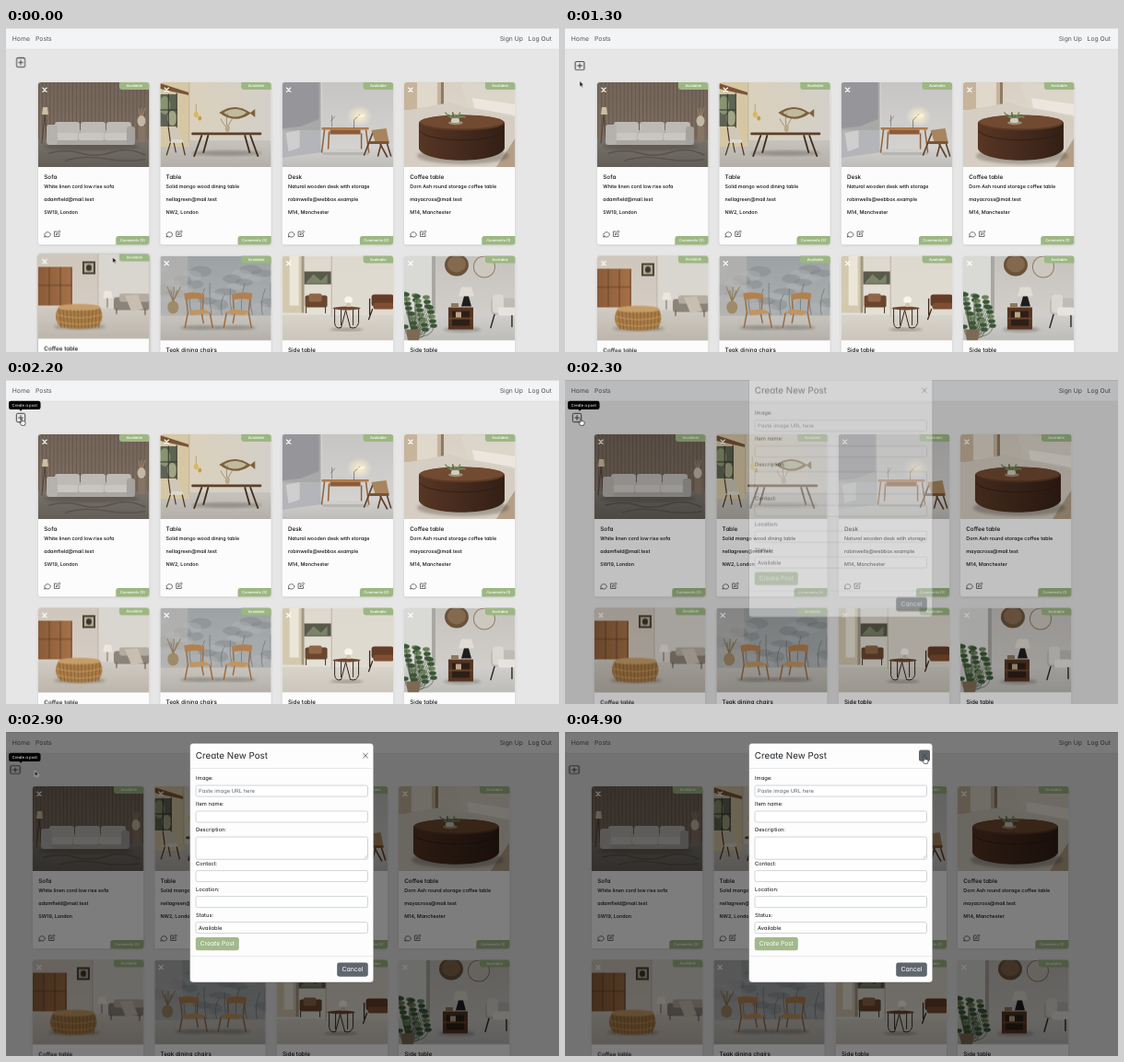
These frames come from a looping animation (600 by 352 pixels, 5 s). An HTML page:

```html
<!DOCTYPE html>
<html lang="en">
<head>
<meta charset="utf-8">
<title>Furniture posts</title>
<style>
  html, body { margin: 0; width: 100%; height: 100%; overflow: hidden; background: #e6e6e6; }
  svg { display: block; }
  text {
    font-family: Inter, "Open Sans", sans-serif;
    font-feature-settings: "cv11";
    text-rendering: geometricPrecision;
  }
  .card text { font-weight: 500; }
</style>
</head>
<body>
<svg id="stage" width="600" height="352" viewBox="0 0 600 352" xmlns="http://www.w3.org/2000/svg"></svg>
<script>
const LOOP = 5000;
const GREEN = '#9db783', INK = '#101112';
const CARD_W = 120.5, CARD_H = 176.5, PHOTO_H = 92;

const rect = (x, y, w, h, fill, rx = 0, more = '') =>
  `<rect x="${x}" y="${y}" width="${w}" height="${h}" fill="${fill}" rx="${rx}" ${more}/>`;
const oval = (x, y, rx, ry, fill, more = '') =>
  `<ellipse cx="${x}" cy="${y}" rx="${rx}" ry="${ry}" fill="${fill}" ${more}/>`;
const fill = (d, color) => `<path d="${d}" fill="${color}"/>`;
const line = (d, color, w = 1) =>
  `<path d="${d}" fill="none" stroke="${color}" stroke-width="${w}" stroke-linecap="round" stroke-linejoin="round"/>`;
const text = (x, y, size, str, color = INK, anchor = 'start') =>
  `<text x="${x}" y="${y}" font-size="${size}" fill="${color}" text-anchor="${anchor}">${str}</text>`;
const cross = (x, y, r, color, w) =>
  line(`M${x - r} ${y - r}l${2 * r} ${2 * r}M${x + r} ${y - r}l${-2 * r} ${2 * r}`, color, w);
const repeat = (n, make) => Array.from({ length: n }, (_, i) => make(i)).join('');
const room = (wall, floor, y) =>
  rect(0, 0, 121, 92, `url(#${wall})`) + rect(0, y, 121, 92 - y, `url(#${floor})`);
const shadow = (x, y, rx, ry) => oval(x, y, rx, ry, '#3a332c', 'opacity=".3" filter="url(#blur)"');
const gradient = (id, a, b, dir = 'x2="0" y2="1"') =>
  `<linearGradient id="${id}" ${dir}><stop stop-color="${a}"/><stop offset="1" stop-color="${b}"/></linearGradient>`;

// Wooden chair, mirrored with dir = -1
const chair = (x, y, dir) => `<g transform="translate(${x} ${y}) scale(${dir} 1)">` +
  line('M1 0L3 20L0 36M20 1L19 18M27 20L30 36M18 20L20 31', '#9a6a3f', 1.4) +
  fill('M-1 -1Q10 -4 21 0L20.500 6Q10 3 0 6Z', '#b3804f') +
  fill('M2 18L20 16L29 20L8 22.500Z', '#c3945f') + '</g>';

const photos = [
  // sofa
  () => room('slat', 'rug', 62) +
    repeat(30, i => rect(i * 4.1, 0, 1, 62, '#54473d', 0, 'opacity=".5"')) +
    line('M7 36L4 66M7 36L10 66', '#3b322b', 0.7) + fill('M5 27h5l1 8h-7z', '#cdbda2') +
    shadow(58, 70, 52, 4) +
    rect(11, 52, 93, 16, '#aaa7a2', 2.5) +
    repeat(3, i => rect(18 + i * 28, 43, 27, 14, '#bdbab5', 3)) +
    repeat(3, i => rect(16 + i * 28, 55, 27.5, 8, '#c9c6c2', 2)) +
    rect(9, 46, 12, 22, '#b5b2ad', 3) + rect(96, 48, 9, 20, '#a5a29d', 3) +
    line('M13 69L103 69', '#5e5953') +
    line('M111 37l-2-8M113 37l3-9M112 37v-9', '#a99272', 0.7) +
    oval(112, 42, 4.5, 6, '#c3b7a6') + rect(109, 48, 7, 17, '#857565') +
    line('M12 77q18-5 34 0t34-1t36 3M30 85q20-6 42-2t44 1', '#57534c', 1.4),
  // dining table
  () => room('plaster', 'stone', 63) +
    rect(0, 0, 31, 70, '#d6c7a4') + rect(0, 13, 18, 35, '#5d6453') +
    oval(5, 25, 6, 10, '#89936f') + oval(13, 39, 5, 8, '#a3a486') +
    line('M0 30H18M9 13V48M18 12V49', '#34322c') + fill('M0 1L31 11V14L0 7Z', '#7a5535') +
    rect(31, 0, 1, 64, '#bdb19a') +
    line('M39 24v14', '#b0904d', 0.7) + oval(39, 35, 2.5, 3, '#d9b75e') + oval(43, 39, 2, 2.5, '#c39c47') +
    fill('M64 33Q81 21 98 33L103 29V38L98 34Q81 46 64 33Z', '#80603c') +
    fill('M69 33Q81 25 94 33Q81 42 69 33Z', '#bdbc9c') +
    shadow(72, 77, 38, 3) +
    line('M45 58L37 80M98 58L106 80M52 58L47 76M92 58L97 76', '#43301f', 1.9) +
    rect(34, 54.5, 76, 2.8, '#5b402b', 1) +
    line('M73 49q-2-9 0-15M73 49q4-8 6-11M72 49q-5-6-6-9', '#7d6647', 0.6) + oval(73, 50, 2.5, 4, '#bba98a') +
    fill('M9 49L20 50L24 65L10 65Z', '#cfc8ba') + rect(10, 62, 15, 4, '#ddd6c9', 2) +
    line('M11 66L7 79M24 66L27 79M15 66L17 76M9 49L11 64', '#4c3725', 1.2),
  // desk
  () => room('pale', 'silver', 72) +
    rect(0, 0, 43, 56, '#a9a8a6') + fill('M0 0H40V40L20 48L0 50Z', '#96969a') +
    fill('M0 52H43V76L0 82Z', '#b4b5b8') + fill('M4 55L19 52V71L7 75Z', '#cfcfcf') +
    rect(42, 0, 1.2, 73, '#dcd9d4') +
    oval(84, 37, 14, 12, 'url(#glow)') +
    rect(44, 76, 50, 3, '#a5a19c', 1, 'opacity=".5"') +
    line('M46 51L43 76M91 52L94 76M51 54L50 72M86 56L86 72', '#8f5f3b', 1.5) +
    rect(43, 49, 51, 2.5, '#b07a4c', 0.6) + rect(52, 51.5, 33, 5, '#8d5c39') +
    line('M78 49V41L84 35', '#6b5e50', 0.7) + fill('M80 37L90 34L89 38Z', '#fbf2d9') +
    rect(58, 46.5, 11, 2.5, '#cfcac2') + line('M54 48V36M53 42L57 37', '#6f756c', 0.7) +
    line('M99 53L89 79M101 57L114 81M111 53L104 80M113 64L118 80', '#5d4029', 1.6) +
    fill('M97 52L113 50L116 65L101 65Z', '#a8855f') + rect(94, 64, 22, 3, '#7b5536', 1),
  // round coffee table
  () => room('cream', 'shag', 28) +
    rect(0, 0, 42, 30, '#c6b49b') + rect(14, 0, 22, 28, '#dfd8cb') + rect(40, 0, 3, 30, '#8e7a62') +
    fill('M0 31L50 22L121 44V92H0Z', '#d6cec2') +
    fill('M62 3Q66 -2 74 1L121 7V38L70 25Z', '#dcd5ca') +
    fill('M74 17L121 24V36L76 28Z', '#ebe6de') + fill('M121 60V92H100Z', '#b39f88') +
    shadow(64, 80, 50, 9) +
    fill('M16 44V72C22 89 102 89 109 72V44Z', 'url(#walnut)') +
    oval(62.5, 44, 46.5, 8.5, '#5a3825') + oval(62.5, 43, 45.5, 7.5, '#714a31') +
    line('M17 53C26 66 99 66 108 53', '#2c1a12', 0.7) +
    oval(56, 44, 8, 2.2, '#a08a74') +
    repeat(9, i => line(`M55 40Q${46 + i * 2.3} 36 ${45 + i * 2.6} ${33 + (i % 3) * 2.5}`, i % 2 ? '#547045' : '#76905f', 1.6)) +
    rect(51, 39, 9, 5, '#d0ccc0', 2),
  // woven table
  () => room('sand', 'beige', 59) +
    rect(65, 0, 56, 59, '#d9d5cf') + rect(64.5, 0, 0.8, 60, '#b5aca1') +
    rect(0, 14, 37, 42, 'url(#oak)') + line('M12 15V55M24 15V55M36 15V55M0 34H36', '#5f3d26', 0.8) +
    rect(48, 8, 14, 14, '#4a4238') + rect(50, 10, 10, 10, '#b5a98f') + oval(55, 15, 3, 3.5, '#3e372e') +
    line('M75 48V58', '#7a6b58') + fill('M72 40h7l2 8h-11z', '#ece6db') +
    rect(82, 47, 39, 14, '#8c8379', 3) + rect(88, 43, 33, 9, '#b4aca1', 3) +
    fill('M94 45L108 44L114 60L101 62Z', '#c9bfb1') +
    line('M85 60v5M116 60v6', '#58483a') + shadow(45, 79, 28, 3) +
    fill('M22 58Q15 70 24 79Q44 84 65 79Q73 70 67 58Z', '#a97c48') +
    oval(44.5, 58, 23, 3.8, '#c79e69') +
    repeat(12, i => line(`M${23 + i * 4} 61L${25 + i * 3.7} 80`, '#735027', 0.6)) +
    line('M20 66Q45 73 69 66M20 73Q45 80 70 73', '#cfa86c', 0.7),
  // chairs and mural
  () => room('mist', 'stone', 65) +
    repeat(26, i => oval((i * 37) % 121, 14 + (i * 17) % 46, 9 + i % 4, 4 + i % 3, i % 2 ? '#7d8385' : '#b4b7b8', 'opacity=".4"')) +
    repeat(9, i => line(`M${34 + i * 11} 64q-3-14 ${i % 2 ? 3 : -2} -${22 + i % 3 * 6}`, '#737a7b', 0.8)) +
    rect(0, 0, 30, 65, '#b9b8b5', 0, 'opacity=".6"') +
    shadow(44, 78, 22, 2.5) + shadow(82, 78, 22, 2.5) +
    repeat(5, i => line(`M14 50L${8 + i * 3.5} ${34 + i % 2 * 4}`, '#8f7a57', 1)) + oval(14, 56, 6, 7, '#a08a68') +
    chair(27, 42, 1) + chair(99, 42, -1),
  // wire side table
  () => room('white', 'bone', 64) +
    rect(0, 0, 22, 62, '#d3c9af') + rect(8, 0, 10, 54, '#ebe6d8') +
    rect(21, 0, 3, 62, '#a39a85') + rect(24, 17, 30, 14, '#5a5a4b') +
    fill('M26 29L34 20L42 27L49 20V30H26Z', '#7c8468') +
    rect(25, 43, 24, 13, '#6b462f', 2) + rect(29, 41, 14, 9, '#8f6748', 2) +
    line('M26 56V62M47 56V62', '#3a2c22') + rect(53, 0, 1.5, 66, '#c4bdae') +
    rect(54.5, 0, 66, 64, '#dfdad0', 0, 'opacity=".8"') +
    rect(97, 42, 24, 13, '#643c28', 3) + rect(99, 51, 22, 7, '#7e4e33', 2) +
    line('M95 47V64M98 58L94 69', '#3d291d', 1.3) +
    shadow(70, 80, 18, 2) +
    line('M57 58V73Q58 80 64 78L69 59L74 78Q81 80 83 73V58M64 58V75M77 58V75', '#33281f', 1) +
    oval(70, 57, 15, 1.9, '#6f4730') + oval(72, 48, 4.5, 4, '#f8f5ee') + rect(70, 51, 4, 4.5, '#cfc3ad'),
  // box side table
  () => room('taupe', 'silver', 63) +
    rect(0, 0, 34, 63, '#d9d9d6') + rect(30, 0, 4, 63, '#a9a6a0') +
    oval(57, 10, 13, 12, '#6a533c') + oval(57, 9, 10, 9, '#83694e') +
    oval(87, 12, 12, 12, '#8c7a64') + oval(87, 12, 11, 11, '#cdc8bf') +
    rect(94, 46, 27, 18, '#bfbcb7', 4) + rect(96, 42, 12, 20, '#d9d7d2', 4) +
    rect(102, 56, 19, 9, '#e6e3de', 3) + line('M98 64L94 78M117 65V77', '#2b2622', 1.4) +
    shadow(63, 80, 20, 3) +
    rect(48, 56, 27, 24, '#553522') + rect(52, 60, 19, 16, '#2d1f17') +
    rect(48, 67, 27, 2, '#6b452c') + rect(56, 61, 6, 6, '#b9a789') +
    fill('M62 34H73L76 44H59Z', '#e1dcd2') + fill('M65 44H70L73 55H62Z', '#1e1d1d') +
    rect(51, 51.5, 8, 4, '#8b795e') +
    repeat(30, i => {
      const x = (i * 13) % 33, y = 41 + (i * 7) % 40;
      return line(`M10 88Q${x} ${y + 13} ${x} ${y}`, '#3e5337', 0.6) + oval(x, y, 3.8, 2.3, i % 3 ? '#3a5638' : '#6b8057');
    }) + fill('M2 80H18L16 92H4Z', '#7d6a55')
];

const items = [
  ['Sofa', 'White linen cord low rise sofa', 'adamfield@mail.test', 'SW19, London', 3],
  ['Table', 'Solid mango wood dining table', 'nellagreen@mail.test', 'NW2, London', 3],
  ['Desk', 'Natural wooden desk with storage', 'robinwells@webbox.example', 'M14, Manchester', 0],
  ['Coffee table', 'Dorn Ash round storage coffee table', 'mayacross@mail.test', 'M14, Manchester', 1],
  ['Coffee table'], ['Teak dining chairs'], ['Side table'], ['Side table']
];

const details = ([, about, mail, place, count]) =>
  text(6.3, 114.7, 5.4, about) + text(6.3, 128.8, 5.45, mail) + text(6.3, 142.8, 5.4, place) +
  line('M8 167.500l-1.300.700.400-1.800A3.200 2.700 0 1 1 8 167.500z', '#444', 0.75) +
  line('M20 162h-2.500v5.500h5.500v-2.500M19.500 165.500l.400-1.700 3-2.700 1.200 1.200-3 2.700z', '#444', 0.75) +
  rect(84.3, 166.9, 45, 20, GREEN, 3) + text(102.4, 173, 4, `Comments (${count})`, '#fff', 'middle');

const card = (item, i) => `<g class="card" transform="translate(${34.9 + (i % 4) * 132.35} ${i < 4 ? 59 : 247.5})"><g id="card${i}">
  ${rect(0, 0.8, CARD_W, CARD_H, '#000', 3, `id="shade${i}" opacity=".1" filter="url(#blur)"`)}
  <g clip-path="url(#cardShape)">
  ${rect(0, 0, CARD_W, CARD_H, '#fcfcfc')}
  <svg width="${CARD_W}" height="${PHOTO_H}"><g filter="url(#soft)">${photos[i]()}</g></svg>
  ${rect(88, -10, 45, 18, GREEN, 3) + text(104.2, 5.1, 4, 'Available', '#fff', 'middle')}
  ${cross(7, 8.2, 2.2, '#fff', 1.1)}
  ${text(6.3, 104.5, 6.3, item[0])}
  ${item[1] ? details(item) : ''}</g></g></g>`;

const plus = rect(-4.7, -4.7, 9.4, 9.4, 'none', 1.3, 'stroke="#444" stroke-width="1"') +
  line('M-2.400 0h4.800M0-2.400v4.800', '#444', 1);

const field = (label, y, h = 12) => text(206, y - 6, 5.8, label) +
  rect(206, y, 186.5, h, '#fff', 1.7, 'stroke="#c5c9ce" stroke-width=".8"');

const modal = rect(199.5, 12.2, 199.3, 259.8, '#fdfdfd', 3.5, 'stroke="#666" stroke-width=".5"') +
  text(205.8, 29, 9.8, 'Create New Post', '#212529') +
  `<g id="closeHover">${rect(384, 19.5, 12, 12.3, '#5c636a', 2)}</g>` + cross(390, 25.6, 2.4, '#444', 0.8) +
  rect(200, 39, 198.5, 0.6, '#d9dcdf') +
  field('Image:', 58) + text(209, 66, 5.8, 'Paste image URL here', '#62676c') +
  field('Item name:', 86) + field('Description:', 114, 24.3) +
  line('M389 137l2.500-2.500M390.500 137l1-1', '#888', 0.4) +
  field('Contact:', 150.6) + field('Location:', 178.6) +
  field('Status:', 206.6) + text(209, 214.7, 5.9, 'Available') +
  rect(205.8, 223, 47, 14.2, '#a2b98b', 2.2) + text(229.3, 232.3, 6.7, 'Create Post', '#fff', 'middle') +
  rect(200, 243.5, 198.5, 0.6, '#d9dcdf') +
  rect(359.2, 250.5, 33.6, 15.2, '#5f666d', 2.4) + text(376, 260.4, 6.95, 'Cancel', '#fff', 'middle');

const arrow = '<path d="M0 0V6.200L1.500 4.900L2.500 7.100L3.500 6.600L2.500 4.500H4.500Z" fill="#111" stroke="#fff" stroke-width=".5"/>';
const hand = '<path d="M-.7.600Q0-.500.700.600V3Q1.300 2.300 1.900 3Q2.500 2.500 3 3.200Q3.700 2.800 4 3.700V5.300L3.300 7.300H-.300L-2.200 4.500Q-1.800 3.500-.700 4.400Z" fill="#fff" stroke="#111" stroke-width=".65" stroke-linejoin="round"/>';

const across = 'x2="1" y2="0"';
const $ = id => document.getElementById(id);
$('stage').innerHTML = `<defs>
  ${gradient('slat', '#74665a', '#837365') + gradient('rug', '#77726a', '#635f58')}
  ${gradient('plaster', '#ddd2b8', '#d3cfc8', across) + gradient('stone', '#c6c3bd', '#b4b0a9')}
  ${gradient('cream', '#d8d0c3', '#e2dcd2') + gradient('silver', '#d0cfcd', '#bebcb8')}
  ${gradient('pale', '#c6c5c4', '#d8d6d3') + gradient('shag', '#d9d1c5', '#c6bbad')}
  ${gradient('sand', '#cfc7bc', '#d8d0c6') + gradient('beige', '#cfcac2', '#bdb6ac')}
  ${gradient('mist', '#9da2a4', '#b0b3b3') + gradient('oak', '#8a5c39', '#a57148', across)}
  ${gradient('white', '#ddd8cc', '#e9e5dc') + gradient('bone', '#d8d4cb', '#cbc5bb')}
  ${gradient('taupe', '#c6c3be', '#d6d3ce') + gradient('walnut', '#573624', '#331f16', across)}
  <radialGradient id="glow"><stop stop-color="#fdf0d0"/><stop offset="1" stop-color="#fdf0d0" stop-opacity="0"/></radialGradient>
  <clipPath id="cardShape"><rect width="${CARD_W}" height="${CARD_H}" rx="3"/></clipPath>
  <filter id="blur"><feGaussianBlur stdDeviation="1.4"/></filter>
  <filter id="soft"><feGaussianBlur stdDeviation=".3"/></filter></defs>
  ${rect(0, 0, 600, 352, '#e6e6e6') + rect(0, 0, 600, 23, '#f3f4f5') + rect(0, 0, 600, 0.7, '#d8d9da') + rect(0, 22.7, 600, 0.6, '#dcdddd')}
  ${text(6.8, 14.1, 6.8, 'Home', '#555') + text(32, 14.1, 6.8, 'Posts', '#555')}
  ${text(561, 14.1, 6.8, 'Sign Up', '#555', 'end') + text(592, 14.1, 6.8, 'Log Out', '#555', 'end')}
  <g id="page">${items.map(card).join('')}
    <g transform="translate(16 41)"><g id="jump"><g id="bounce">${plus}</g></g><g id="still">${plus}</g></g></g>
  <g id="shadeAll">${rect(0, 0, 600, 352, '#000')}</g>
  <g id="tip">${rect(3, 22.7, 34.5, 9.2, '#000', 2.2) + fill('M14 31.500h4l-2 2.300z', '#000') + text(20.2, 28.8, 4.25, 'Create a post', '#fff', 'middle')}</g>
  <g id="modal">${modal}</g>
  <g id="cursor"><g id="arrow">${arrow}</g><g id="hand">${hand}</g></g>`;

// steps: [time in ms, value, easing to the next step]
function play(id, prop, steps) {
  const all = [[0, steps[0][1]], ...steps, [LOOP, steps[steps.length - 1][1]]];
  $(id).animate(all.map(([t, v, easing = 'linear']) => ({ offset: t / LOOP, [prop]: v, easing })),
    { duration: LOOP, iterations: Infinity });
}
const at = (x, y) => `translate(${x}px, ${y}px)`;
const toggle = (id, first, ...times) => play(id, 'opacity',
  [[0, first], ...times.flatMap((t, i) => [[t, (first + i) % 2], [t, (first + i + 1) % 2]])]);

play('cursor', 'transform', [
  [120, at(115.7, 249), 'ease-in-out'], [700, at(15.5, 63.4)],
  [1200, at(15.5, 63.4), 'ease-in-out'], [1480, at(17, 42)],
  [2800, at(17, 42), 'ease-in-out'], [3450, at(311, 43)],
  [4300, at(311, 43), 'ease-in-out'], [4750, at(390, 27)]
]);
toggle('hand', 0, 1400, 2860, 4640);
toggle('arrow', 1, 1400, 2860, 4640);
toggle('closeHover', 0, 4640);
toggle('still', 0, 1400, 2860);
toggle('jump', 1, 1400, 2860);

play('card4', 'transform', [[190, at(0, -2), 'ease-out'], [340, at(0, 0)]]);
play('shade4', 'opacity', [[190, 0.35], [340, 0.1]]);
play('card0', 'transform', [[260, at(0, 0), 'ease-out'], [400, at(0, -2)], [520, at(0, -2), 'ease-out'], [670, at(0, 0)]]);
play('shade0', 'opacity', [[260, 0.1], [400, 0.35], [520, 0.35], [670, 0.1]]);

play('tip', 'opacity', [[1450, 0], [1580, 1], [2940, 1], [3090, 0]]);
play('page', 'transform', [[2290, at(0, 0)], [2290, at(-3, 0)], [2460, at(-3, 0)], [2460, at(-6, 0)]]);
play('shadeAll', 'opacity', [[2230, 0], [2380, 0.5]]);
play('modal', 'opacity', [[2240, 0], [2390, 1]]);
play('modal', 'transform', [[2240, at(0, -21), 'ease-out'], [2540, at(0, 0)]]);

const hop = [
  [0, 0, 1, 1], [0.1, 0, 1.1, 0.9], [0.3, -5, 0.9, 1.1], [0.5, 0, 1.05, 0.95],
  [0.57, -1.2, 1, 1], [0.64, 0, 1, 1], [1, 0, 1, 1]
];
$('bounce').animate(
  hop.map(([offset, y, sx, sy]) => ({
    offset, transform: `translateY(${y}px) scale(${sx}, ${sy})`, easing: 'cubic-bezier(.28,.84,.42,1)'
  })),
  { duration: 1000, delay: -160, iterations: Infinity });
</script>
</body>
</html>
```
